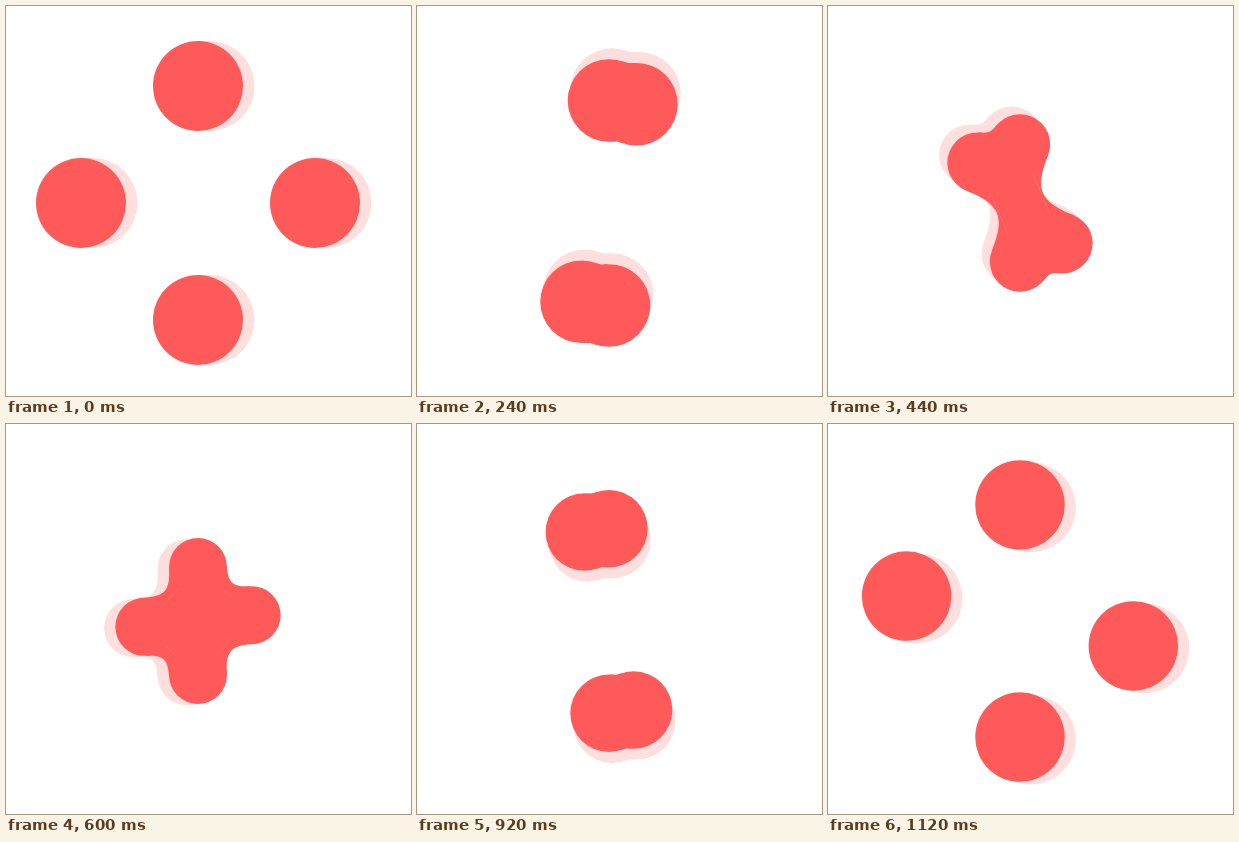
Write an HTML page with a canvas that moves like this. It is 405x390 px and loops after 1160 ms.

```html
<!DOCTYPE html>
<html>
<head>
<meta charset="utf-8">
<title>Liquid loader</title>
<style>
  html, body { margin: 0; height: 100%; overflow: hidden; background: #fff; }
  canvas { display: block; }
</style>
</head>
<body>
<canvas id="stage" width="405" height="390"></canvas>
<script>
const ctx = document.getElementById('stage').getContext('2d');
const STEP = 40, STEPS = 29, HALF = 15;
const CX = 192, CY = 197;
const mix = (a, b, p) => a + (b - a) * p;
const polar = (x, y, angle, len) => [x + len * Math.cos(angle), y + len * Math.sin(angle)];

// cubic-bezier(.7, 0, .3, 1), solved by bisection
function ease(x) {
  let lo = 0, hi = 1;
  for (let i = 0; i < 24; i++) {
    const t = (lo + hi) / 2, u = 1 - t;
    if (2.1 * t * u * u + 0.9 * t * t * u + t * t * t < x) lo = t; else hi = t;
  }
  return lo * lo * (3 - 2 * lo);
}

// Liquid neck between two balls of equal radius
function bridge(a, b, r, dist) {
  const axis = Math.atan2(b[1] - a[1], b[0] - a[0]);
  const overlap = Math.acos(Math.min(1, dist / (2 * r)));
  const spread = (overlap + Math.PI / 2) / 2;
  const handle = 0.56 * (dist - 2 * r * Math.cos(spread));
  for (const side of [-1, 1]) {
    const out = axis + side * spread, back = axis + Math.PI - side * spread;
    const p = polar(...a, out, r), q = polar(...b, back, r);
    const c = polar(...p, out - side * Math.PI / 2, handle);
    const d = polar(...q, back + side * Math.PI / 2, handle);
    ctx.beginPath();
    ctx.moveTo(...a);
    ctx.lineTo(...p);
    ctx.bezierCurveTo(...c, ...d, ...q);
    ctx.lineTo(...b);
    ctx.fill();
  }
}

function blob(x, y, spin, p, color) {
  const r = mix(29, 45, p), orbit = mix(54, 117, p);
  const angles = [spin, spin + Math.PI, Math.PI / 2, -Math.PI / 2]
    .map(a => Math.atan2(Math.sin(a), Math.cos(a)))
    .sort((a, b) => a - b);
  const balls = angles.map(a => polar(x, y, a, orbit));
  ctx.fillStyle = color;
  let joined = 0;
  balls.forEach((a, i) => {
    const b = balls[(i + 1) % 4];
    const dist = Math.hypot(b[0] - a[0], b[1] - a[1]);
    ctx.beginPath();
    ctx.arc(...a, r, 0, 2 * Math.PI);
    ctx.fill();
    // Balls further apart than this have snapped loose
    if (dist < 4 * r && p < 0.5 || dist < 2 * r) {
      joined++;
      if (dist > 1) bridge(a, b, r, dist);
    }
  });
  if (joined === 4) {
    ctx.beginPath();
    balls.forEach(b => ctx.lineTo(...b));
    ctx.fill();
  }
}

function draw() {
  const n = Math.floor(performance.now() / STEP) % STEPS;
  const spin = -2 * Math.PI * n / STEPS;
  const p = ease(Math.abs(n - HALF) / HALF);
  ctx.clearRect(0, 0, 405, 390);
  blob(...polar(CX, CY, spin, 11.3), spin, p, '#ffdede');
  blob(CX, CY, spin, p, '#ff5a5a');
  requestAnimationFrame(draw);
}
draw();
</script>
</body>
</html>
```
